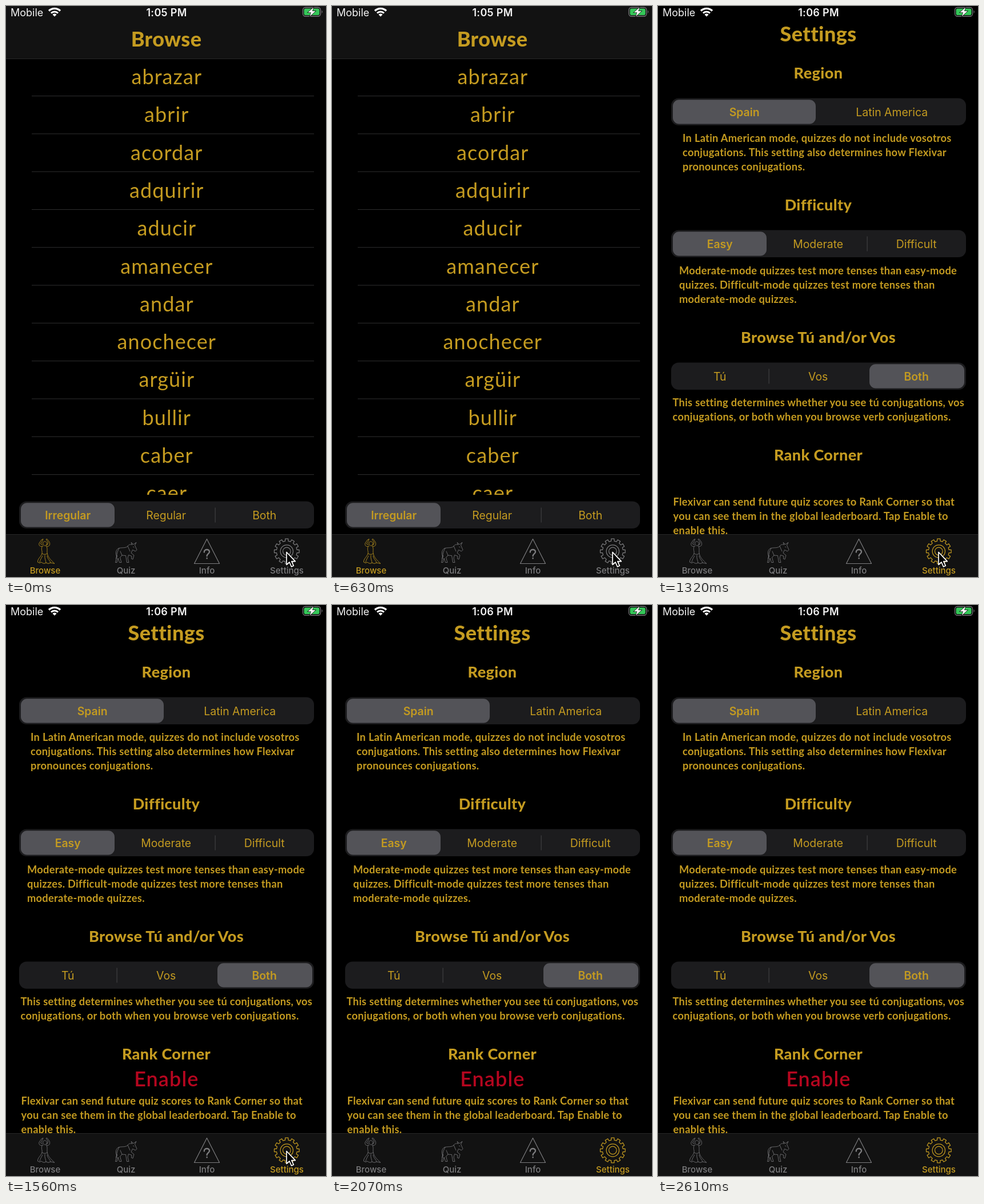
These frames come from a looping animation (560x1000 px, 2.64 s). An HTML page:

```html
<!DOCTYPE html>
<html lang="en">
<head>
<meta charset="utf-8">
<title>Verb browser</title>
<style>
  html, body { margin: 0; width: 100%; height: 100%; overflow: hidden; background: #000; }
  svg { display: block; width: 560px; height: 1000px; }
  text { white-space: pre; }
  .mid { text-anchor: middle; }
  .row, .title, .head, .body, .enable { font-family: Lato, "Open Sans", sans-serif; fill: #c49b20; }
  .row { font-size: 36px; letter-spacing: 1.1px; }
  .title { font-size: 36px; font-weight: 800; letter-spacing: .4px; }
  .head { font-size: 27px; font-weight: 800; letter-spacing: .4px; }
  .body { font-size: 18.3px; font-weight: 700; letter-spacing: .28px; }
  .enable { font-size: 36px; font-weight: 600; letter-spacing: 1.1px; fill: #b5061f; }
  .seg, .tab, .status { font-family: Inter, Roboto, sans-serif; }
  .seg { font-size: 19.4px; fill: #c49b20; }
  .on { font-weight: 600; }
  .tab { font-size: 15px; font-weight: 500; }
  .status { font-size: 18px; fill: #f4f4f4; }
  .clock { font-weight: 600; letter-spacing: .3px; }
  .icon { fill: none; stroke-width: 1.2; stroke-linejoin: round; stroke-linecap: round; }
  .fine { stroke-width: .8; }
</style>
</head>
<body>
<svg id="stage" viewBox="0 0 560 1000" xmlns="http://www.w3.org/2000/svg"></svg>
<script>
const LOOP = 2640, OPEN_SETTINGS = 1200, SHOW_ENABLE = 1530, HIDE_CURSOR = 1920;
const GOLD = '#c49b20', GREY = '#7c7c7e';

const text = (cls, x, y, s) => `<text class="${cls}" x="${x}" y="${y}">${s}</text>`;
const rect = (x, y, w, h, fill, r = 0) =>
  `<rect x="${x}" y="${y}" width="${w}" height="${h}" rx="${r}" fill="${fill}"/>`;
const path = (d, extra = '') => `<path d="${d}" ${extra}/>`;

function wifi() {
  const sector = (r1, r2) => {
    const k = Math.SQRT1_2, cx = 85, cy = 18.5;
    const p = (r, s) => `${cx + s * r * k} ${cy - r * k}`;
    return `M${p(r2, -1)}A${r2} ${r2} 0 0 1 ${p(r2, 1)}L${p(r1, 1)}A${r1} ${r1} 0 0 0 ${p(r1, -1)}Z`;
  };
  return path(sector(0.1, 5) + sector(7, 10) + sector(12.4, 15.8), 'fill="#fff"');
}

function statusBar(time) {
  return text('status', 8, 17.5, 'Mobile') + wifi() +
    text('status clock mid', 281, 17.5, time) +
    '<rect x="519.5" y="2.5" width="31" height="15.5" rx="4.5" fill="none" stroke="#77777a" stroke-width="1.3"/>' +
    path('M552.6 7.5q2.4 2.7 0 5.4z', 'fill="#77777a"') +
    rect(521.5, 4.5, 27, 11.5, '#35c759', 2.8) +
    path('M538 2.5L528.5 11.3H534L531.8 18L541.5 9H536Z',
      'fill="#fff" stroke="#111" stroke-width="1.4" paint-order="stroke"');
}

function segments(y, labels, active) {
  const w = 516 / labels.length, last = labels.length - 1;
  let out = rect(23, y, 516, 47.5, '#1c1c1e', 13);
  labels.forEach((label, i) => {
    const x = 23 + i * w, right = i === last ? 3 : 5;
    if (i === active) out += rect(x + 3, y + 2.7, w - 3 - right, 42.2, '#535358', 11);
    else if (i && i - 1 !== active) out += rect(x - 1.5, y + 11, 1.3, 26, '#3c3c3f');
    out += text('seg mid' + (i === active ? ' on' : ''), x + w / 2 - .8, y + 31, label);
  });
  return out;
}

function gear() {
  const teeth = 12, cx = 491.3, cy = 955, pts = [];
  const at = (r, a) => pts.push((cx + r * Math.cos(a)).toFixed(1) + ' ' + (cy + r * Math.sin(a)).toFixed(1));
  for (let i = 0; i < teeth; i++) {
    const a = (i / teeth) * 2 * Math.PI - Math.PI / 2;
    at(18, a - .15); at(22, a - .12); at(22, a + .12); at(18, a + .15);
  }
  return path(`M${pts.join('L')}Z`) +
    [11.2, 6.8].map(r => `<circle cx="${cx}" cy="${cy}" r="${r}"/>`).join('');
}

const dancer = path(
  'M64.5 941C64 937 71 936.5 71.5 941C71.5 946 66 947.5 64.5 941' +
  'M65 946C60 948 57 945 58 941L62 935L65 933.5L63.5 937L60.5 942L64 944' +
  'M70 946C75 948 78 944 76 939L72 933.5L70 934L73.5 939L73 943L70.5 944' +
  'M63 947C61 952 64 955 63 959C61 965 55 968 55.5 974Q59 977 62 974Q66 978 70 975Q74 978 78 975L85 976.5' +
  'C79 971 74 966 72.5 960C71 956 73 952 71.5 947' +
  'M63 959Q68 962 72 959M64 963C61 968 60 970 59 974M68 962C67 968 70 971 70 975M72 963C73 969 77 971 78 975',
  'class="fine"');

const bull = path(
  'M194 965C191 959 192 951 198 949.5C204 948 209 950 213 946C215 943 218 942.5 221 943.5L219 939.5' +
  'L223 943L228 939.5L225.5 944.5L229 952.5L226.5 955L221.5 952.5L219 958L224 962L222 969L219.5 968L220 963.5' +
  'L214.5 961.5L213 967L215 974.5H211.5L209.5 962.5L203 962L199.5 966L202 974.5H198.5L196 967L194 974.5H191.5L194.5 962.5' +
  'M198 949.5L195 956L192.5 968M213 946L217 955M203 962L200 955M222.5 947L224 948',
  'class="fine"');

const info = path('M351.5 933.5L373.5 976.5H329.5Z') +
  path('M346.8 956.5C346.8 950.5 356.2 950.8 356 956C355.8 959.5 351.6 959.3 351.6 963.2M351.6 967V967.4',
    'stroke-width="2.4"');

function tabBar(active) {
  const tabs = [[68.5, 'Browse', dancer], [210, 'Quiz', bull], [351.5, 'Info', info], [491.5, 'Settings', gear()]];
  return rect(0, 925, 560, 75, '#121212') + rect(0, 925, 560, 1, '#272727') +
    tabs.map(([x, label, icon]) => {
      const color = label === active ? GOLD : GREY;
      return `<g class="icon" stroke="${color}">${icon}</g>` +
        `<g fill="${color}">${text('tab mid', x, 994.3, label)}</g>`;
    }).join('');
}

function browse() {
  const verbs = ['abrazar', 'abrir', 'acordar', 'adquirir', 'aducir', 'amanecer', 'andar',
    'anochecer', 'argüir', 'bullir', 'caber', 'caer'];
  const rows = verbs.map((v, i) => {
    const y = i * 66.3;
    return text('row mid', 281.3, 137 + y, v) + rect(45, 157 + y, 494, 1.1, '#2b2b2c');
  }).join('');
  return rect(0, 0, 560, 1000, '#000') + rows + rect(0, 856, 560, 70, '#000') +
    rect(0, 0, 560, 92, '#121212') + rect(0, 92, 560, 1, '#272727') +
    statusBar('1:05 PM') + text('title mid', 280.5, 70.5, 'Browse') +
    segments(867.5, ['Irregular', 'Regular', 'Both'], 0) + tabBar('Browse');
}

function settings() {
  const heads = [[127, 'Region'], [358, 'Difficulty'], [590, 'Browse Tú and/or Vos'], [796, 'Rank Corner']];
  const notes = [
    [43, 238, 'In Latin American mode, quizzes do not include vosotros',
      'conjugations. This setting also determines how Flexivar', 'pronounces conjugations.'],
    [37, 470, 'Moderate-mode quizzes test more tenses than easy-mode',
      'quizzes. Difficult-mode quizzes test more tenses than', 'moderate-mode quizzes.'],
    [25.5, 701, 'This setting determines whether you see tú conjugations, vos',
      'conjugations, or both when you browse verb conjugations.'],
    [26.5, 874.5, 'Flexivar can send future quiz scores to Rank Corner so that',
      'you can see them in the global leaderboard. Tap Enable to', 'enable this.']
  ];
  return rect(0, 0, 560, 1000, '#000') + statusBar('1:06 PM') +
    text('title mid', 280.5, 62, 'Settings') +
    heads.map(([y, s]) => text('head mid', 280.5, y, s)).join('') +
    notes.map(([x, y, ...lines]) => lines.map((s, i) => text('body', x, y + i * 25, s)).join('')).join('') +
    segments(161.5, ['Spain', 'Latin America'], 0) +
    segments(392.5, ['Easy', 'Moderate', 'Difficult'], 0) +
    segments(624.5, ['Tú', 'Vos', 'Both'], 2) +
    `<g id="enable">${text('enable mid', 280.8, 843, 'Enable')}</g>` + tabBar('Settings');
}

const cursor = path('M491 956.5V978.5L496 974L499.5 982L503.3 980.3L499.8 972.6H506.3Z',
  'fill="#000" stroke="#fff" stroke-width="1.7" stroke-linejoin="round"');

document.getElementById('stage').innerHTML =
  `<g id="browse">${browse()}</g><g id="settings">${settings()}</g><g id="cursor">${cursor}</g>`;

// Hard on/off visibility within the loop.
function show(id, from, to) {
  const frames = [0, from, to, LOOP]
    .filter((t, i, all) => all.indexOf(t) === i)
    .map(t => ({ offset: t / LOOP, opacity: t >= from && t < to ? 1 : 0, easing: 'step-end' }));
  document.getElementById(id).animate(frames, { duration: LOOP, iterations: Infinity });
}

show('browse', 0, OPEN_SETTINGS);
show('settings', OPEN_SETTINGS, LOOP);
show('enable', SHOW_ENABLE, LOOP);
show('cursor', 0, HIDE_CURSOR);
</script>
</body>
</html>
```
